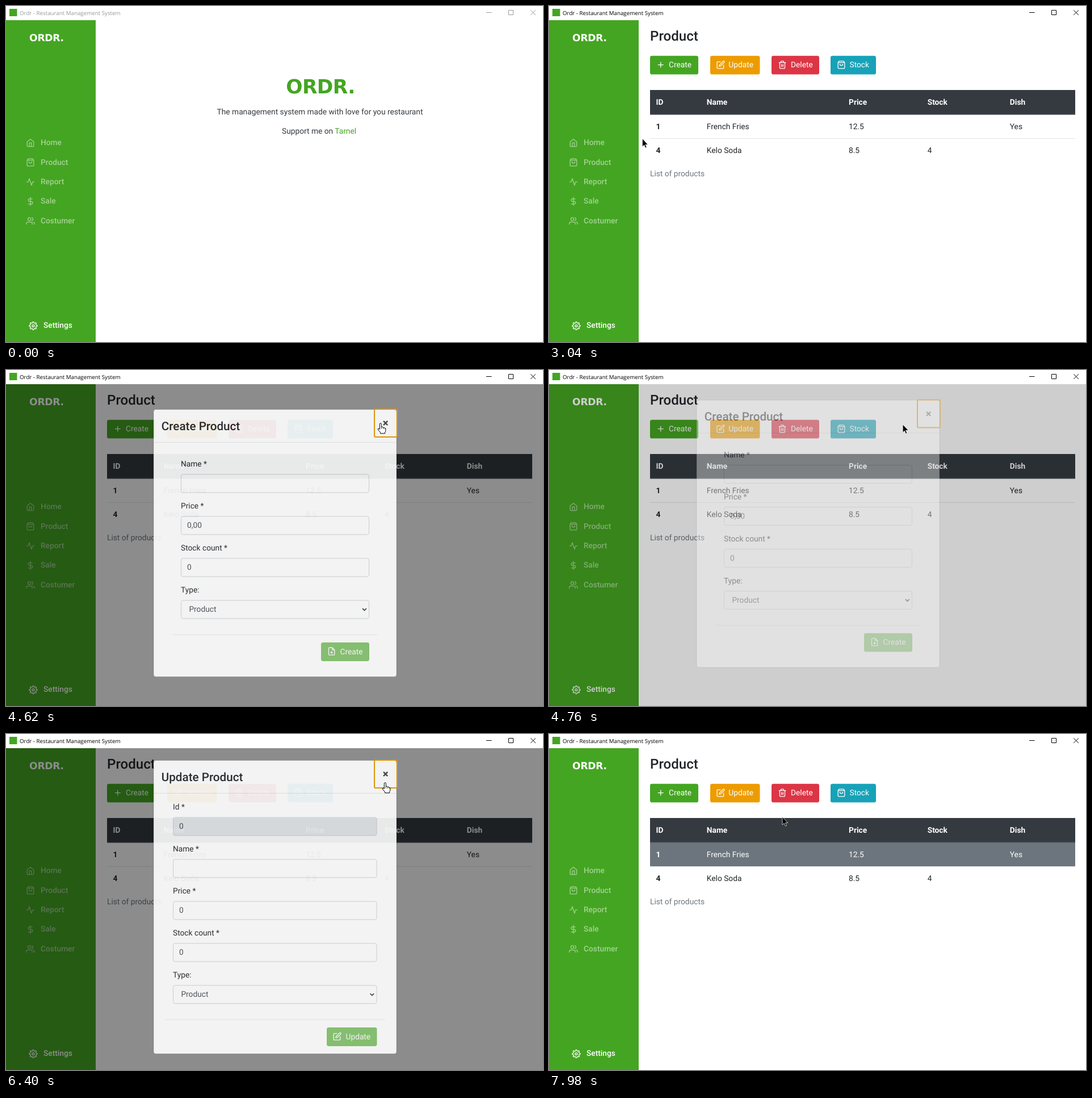
An HTML page that plays this animation: 946 px wide and 592 px high, repeating every 8 s.

```html
<!DOCTYPE html>
<html lang="en">
<head>
<meta charset="utf-8">
<title>Ordr - Restaurant Management System</title>
<style>
  html, body { margin: 0; width: 100%; height: 100%; overflow: hidden; background: #fff; }
  svg { display: block; width: 946px; height: 592px; text-rendering: geometricPrecision; }
  text { font: 13.76px Roboto, sans-serif; fill: #212529; white-space: pre; }
  .icon { fill: none; stroke: #fff; stroke-width: 2; stroke-linecap: round; stroke-linejoin: round; }
  .white { fill: #fff; }
  .soft { fill: #343a40; }
  .muted { fill: #6c757d; }
  .value { fill: #495057; }
  .brand { font-family: 'DejaVu Sans', sans-serif; font-weight: 700; letter-spacing: -.017em; }
  .nav text { fill: #fff; font-weight: 500; }
  .bold { font-weight: 700; }
  .title { font-size: 20.64px; font-weight: 500; }
  .hot rect { fill: #6c757d; }
  .hot text { fill: #fff; }
</style>
</head>
<body>
<svg id="stage" viewBox="0 0 946 592"></svg>
<script>
const GREEN = '#44a522';
const LOOP = 8000;

// Feather-style outlines on a 24 unit grid
const ICONS = {
  home: 'M3 9l9-7 9 7v11a2 2 0 0 1-2 2H5a2 2 0 0 1-2-2zM9 22V12h6v10',
  bag: 'M6 2L3 6v14a2 2 0 0 0 2 2h14a2 2 0 0 0 2-2V6l-3-4zM3 6h18M16 10a4 4 0 0 1-8 0',
  pulse: 'M22 12h-4l-3 9L9 3l-3 9H2',
  dollar: 'M12 1v22M17 5H9.5a3.5 3.5 0 0 0 0 7h5a3.5 3.5 0 0 1 0 7H6',
  users: 'M17 21v-2a4 4 0 0 0-4-4H5a4 4 0 0 0-4 4v2M13 7a4 4 0 1 1-8 0 4 4 0 0 1 8 0zM23 21v-2a4 4 0 0 0-3-3.87M16 3.13a4 4 0 0 1 0 7.75',
  plus: 'M12 5v14M5 12h14',
  edit: 'M11 4H4a2 2 0 0 0-2 2v14a2 2 0 0 0 2 2h14a2 2 0 0 0 2-2v-7M18.5 2.5a2.12 2.12 0 0 1 3 3L12 15l-4 1 1-4z',
  trash: 'M3 6h18M19 6v14a2 2 0 0 1-2 2H7a2 2 0 0 1-2-2V6m3 0V4a2 2 0 0 1 2-2h4a2 2 0 0 1 2 2v2M10 11v6M14 11v6',
  file: 'M14 2H6a2 2 0 0 0-2 2v16a2 2 0 0 0 2 2h12a2 2 0 0 0 2-2V8zM14 2v6h6M12 18v-6M9 15h6',
  gear: gearPath()
};

function gearPath() {
  const pts = [];
  for (let i = 0; i < 96; i++) {
    const a = i / 96 * 2 * Math.PI;
    const r = 9.4 + 1.6 * Math.tanh(2 * Math.cos(8 * a));
    pts.push((12 + r * Math.cos(a)).toFixed(2) + ' ' + (12 + r * Math.sin(a)).toFixed(2));
  }
  return 'M' + pts.join('L') + 'zM15 12a3 3 0 1 1-6 0 3 3 0 0 1 6 0z';
}

const text = (x, y, s, cls = '', extra = '') => `<text x="${x}" y="${y}" class="${cls}" ${extra}>${s}</text>`;
const rect = (x, y, w, h, fill, extra = '') => `<rect x="${x}" y="${y}" width="${w}" height="${h}" fill="${fill}" ${extra}/>`;
const rule = (x1, x2, y, color) => rect(x1, y, x2 - x1, 0.9, color);
const icon = (name, cx, cy, size = 15.5) =>
  `<path class="icon" d="${ICONS[name]}" transform="translate(${cx - size / 2} ${cy - size / 2}) scale(${size / 24})"/>`;

const NAV = [['home', 'Home'], ['bag', 'Product'], ['pulse', 'Report'], ['dollar', 'Sale'], ['users', 'Costumer']];
const navY = i => 240.4 + 34.4 * i;

// x, width, icon, icon centre, label, label x, colour, hover colour
const BUTTONS = [
  [178, 85, 'plus', 196.8, 'Create', 211, GREEN, '#36851b'],
  [284, 87.5, 'edit', 302.5, 'Update', 316.3, '#ed9c00', '#c78300'],
  [392, 84, 'trash', 411, 'Delete', 426, '#dc3545', '#c82333'],
  [496, 80, 'bag', 515, 'Stock', 529.5, '#17a2b8', '#138496']
];
const COLS = [188.5, 277.8, 528, 666.7, 811.8];
const ROWS = [['1', 'French Fries', '12.5', '', 'Yes'], ['4', 'Kelo Soda', '8.5', '4', '']];

function sidebar() {
  return rect(0, 25, 158, 567, GREEN) +
    text(41.1, 62, 'ORDR.', 'brand white', 'style="font-size:17.2px"') +
    NAV.map(([ic, label], i) =>
      `<g class="nav" opacity=".5">${icon(ic, 43, navY(i) + .7)}${text(61, navY(i) + 4.8, label)}</g>`).join('') +
    `<g class="nav">${icon('gear', 48, 563.5)}${text(66, 567, 'Settings')}</g>`;
}

function homePage() {
  return `<g id="home">` +
    text(493.3, 154, 'ORDR.', 'brand', `style="font-size:34.4px;fill:${GREEN}"`) +
    text(553, 191, 'The management system made with love for you restaurant', 'soft', 'text-anchor="middle"') +
    text(486, 225.3, `Support me on <tspan fill="${GREEN}">Tarnel</tspan>`, 'soft') + `</g>`;
}

function productPage() {
  const buttons = BUTTONS.map(([x, w, ic, ix, label, tx, color]) =>
    `<g class="btn">${rect(x, 87.7, w, 32.9, color, 'rx="3.4"')}${icon(ic, ix, 103.6)}${text(tx, 108.4, label, 'white')}</g>`);
  const rows = ROWS.map((cells, r) => {
    const y = 191.4 + 42.1 * r;
    return `<g class="row">${rect(178, y, 749, 42, '#fff')}` +
      cells.map((c, i) => text(COLS[i], y + 25.4, c, i ? '' : 'bold')).join('') + '</g>';
  });
  return `<g id="product">` + text(178, 61, 'Product', '', 'style="font-size:24.08px;font-weight:500"') +
    buttons.join('') + rect(178, 148, 749, 43.4, '#343a40') +
    ['ID', 'Name', 'Price', 'Stock', 'Dish'].map((h, i) => text(COLS[i], 174, h, 'bold white')).join('') +
    rows.join('') + rect(178, 190, 749, 1.6, '#454d55') + rule(178, 927, 233, '#dee2e6') +
    text(178, 300.3, 'List of products', 'muted') + `</g>`;
}

// Fields are [label, value, kind]; y values are relative to the dialog's top edge
function dialog(d) {
  const fields = d.fields.map(([label, value, kind], i) => {
    const y = d.first + 74 * i, isSelect = kind === 'select';
    return text(d.x, y - 13.4, label) +
      rect(d.x + .5, y + .5, d.w - 1, 32, kind === 'locked' ? '#e9ecef' : '#fff', 'rx="3.4" stroke="#ced4da"') +
      text(d.x + (isSelect ? 14.4 : 11), y + 20.9, value, 'value') +
      (isSelect ? `<path d="M${d.x + d.w - 12} ${y + 14.8}l3.4 3.4 3.4-3.4" fill="none" stroke="#343a40" stroke-width="1.7"/>` : '');
  }).join('');
  const hr = d.first + 74 * (d.fields.length - 1) + 60.3;
  const right = d.x + d.w;
  return `<g class="dialog" display="none">` +
    rect(260, .5, 428, d.h - 1, '#fff', 'rx="4" stroke="#000" stroke-opacity=".2"') +
    text(273.8, 36.6, d.title, 'title') + rule(260.5, 687.5, 58, '#dee2e6') +
    `<path class="x" d="M665 21l7.2 7.2M672.2 21l-7.2 7.2" stroke="#000" stroke-width="2.4"/>` +
    rect(649, 0, 40, 49, 'none', 'class="ring" rx="2" stroke="#e59700" stroke-width="2"') +
    fields + rule(d.x - 14, right + 14, hr, '#e5e5e5') +
    `<g opacity=".65">${rect(right - d.bw, hr + 14.3, d.bw, 32.9, GREEN, 'rx="3.4"')}` +
    icon(d.icon, right - d.bw + 18.6, hr + 30) + text(right - d.bw + 33.5, hr + 35, d.action, 'white') + `</g></g>`;
}

const DIALOGS = [
  { title: 'Create Product', x: 308, w: 332, first: 114.5, h: 472, top: 72.5, icon: 'file', action: 'Create', bw: 85,
    fields: [['Name *', ''], ['Price *', '0,00'], ['Stock count *', '0'], ['Type:', 'Product', 'select']],
    open: 3624, press: 4530, close: 4599 },
  { title: 'Update Product', x: 294, w: 359.5, first: 100.5, h: 518, top: 49.5, icon: 'edit', action: 'Update', bw: 88.5,
    fields: [['Id *', '0', 'locked'], ['Name *', ''], ['Price *', '0'], ['Stock count *', '0'], ['Type:', 'Product', 'select']],
    open: 5326, press: 6315, close: 6384 }
];

function titleBar() {
  return rect(0, 0, 946, 25, '#fff') + rect(6, 5, 13.5, 13, GREEN) +
    `<g id="bar">` + text(24, 15.6, 'Ordr - Restaurant Management System', '', `style="font:9.75px 'Open Sans',sans-serif;fill:currentColor"`) +
    `<path d="M846 11.5h9.5M885.5 7.5h8v8h-8zM924.3 7.3l8.6 8.6M932.9 7.3l-8.6 8.6" fill="none" stroke="currentColor"/></g>`;
}

const cursors =
  `<g id="cursor"><path id="arrow" d="M0 0V14.2L3.2 11.2 5.4 16.2 7.6 15.2 5.4 10.4H9.8Z" fill="#000" stroke="#fff" stroke-width=".7"/>` +
  `<g id="hand" stroke="#000"><path d="M-1.7 10.5V1.2a1.5 1.5 0 0 1 3 0V6.2q3 .1 3.2 1 2.6 .1 2.8 1 1.5.2 1.5 1.6v2.8q0 2-1.2 3.2v2h-8v-1.6L-4.6 11q-.8-1.6.6-1.9 1-.1 2.3 1.4z" fill="#fff"/>` +
  `<path d="M1.3 6.2v3.6M4.5 7.2v2.8M7.3 8.2v2" fill="none" stroke-width=".8"/></g></g>`;

const stage = document.getElementById('stage');
stage.innerHTML = rect(0, 0, 946, 592, '#fff') + sidebar() + homePage() + productPage() +
  rect(0, 25, 946, 567, '#000', 'id="shade" opacity="0"') + DIALOGS.map(dialog).join('') + titleBar() + cursors;

const $ = id => document.getElementById(id);
const all = sel => [...stage.querySelectorAll(sel)];
const navEls = all('.nav').slice(0, NAV.length), btnEls = all('.btn'), rowEls = all('.row'), dialogEls = all('.dialog');
const show = (el, on) => el.setAttribute('display', on ? 'inline' : 'none');

// Bursts of motion: start, end, number of steps
const BURSTS = [
  [220, 680, 7], [850, 1240, 6], [1410, 1480, 2], [1800, 1880, 2], [2030, 2430, 6], [2750, 3520, 11],
  [3600, 4370, 11], [4460, 5230, 11], [5300, 6090, 11], [6320, 7030, 10], [7350, 7980, 9]
];
// Pointer path: time, x, y
const PATH = [
  [220, 684, 432], [680, 112, 143], [775, 112, 143], [1160, 98, 262], [1240, 98, 265], [1340, 98, 265],
  [1480, 95, 241], [1950, 95, 241], [2110, 100, 268], [2190, 101, 275], [2680, 101, 275], [3140, 198, 212],
  [3500, 251, 119.3], [3680, 251, 119.3], [4370, 665, 99], [4400, 665, 99], [4530, 660, 94], [4616, 660, 94],
  [5215, 366, 109.5], [5385, 366, 109.5], [6090, 670, 92], [6250, 670, 92], [6320, 668, 86], [6405, 668, 86],
  [6950, 444, 112], [7270, 444, 112], [7820, 428, 204], [7905, 423, 195], [7980, 411, 146]
];
const LAG = 77;

function stepped(t) {
  const burst = BURSTS.filter(b => b[0] <= t).pop();
  if (!burst) return 0;
  const [a, b, n] = burst, d = (b - a) / (n - 1);
  return a + d * Math.min(n - 1, Math.floor((t - a) / d + 1e-6));
}

function pointer(t) {
  const i = PATH.findIndex(p => p[0] > t);
  if (i === 0) return PATH[0].slice(1);
  if (i < 0) return PATH[PATH.length - 1].slice(1);
  const [t0, x0, y0] = PATH[i - 1], [t1, x1, y1] = PATH[i];
  const k = (t - t0) / (t1 - t0);
  return [x0 + (x1 - x0) * k, y0 + (y1 - y0) * k];
}

const clamp = v => Math.max(0, Math.min(1, v));
const easeOut = p => 1 - Math.pow(1 - clamp(p), 1.7);
const within = (v, a, b) => v >= a && v < b;

function draw(time) {
  const t = stepped(time);
  const [x, y] = pointer(t), [hx, hy] = pointer(t - LAG);
  const onProduct = t >= 2349;
  let shade = 0, blocked = false, overClose = false;

  DIALOGS.forEach((d, i) => {
    const closing = t >= d.close, since = t - (closing ? d.close : d.open);
    const fade = clamp(since / 150), slide = easeOut(since / 300);
    const alpha = closing ? 1 - fade : fade;
    const lift = 43 * (closing ? slide : 1 - slide);
    const el = dialogEls[i];
    show(el, alpha > 0);
    el.setAttribute('opacity', alpha);
    el.setAttribute('transform', `translate(0 ${d.top - lift})`);
    show(el.querySelector('.ring'), t >= d.press);
    const solid = alpha > .5;
    const over = solid && within(hx, 649, 689) && within(hy, d.top, d.top + 50);
    el.querySelector('.x').setAttribute('opacity', over ? .75 : .5);
    shade = Math.max(shade, alpha / 2);
    blocked = blocked || solid;
    overClose = overClose || over;
  });
  $('shade').setAttribute('opacity', shade);

  let overNav = false;
  navEls.forEach((el, i) => {
    const hot = !blocked && t > 0 && within(hx, 36, 122) && Math.abs(hy - navY(i)) < 12;
    el.setAttribute('opacity', hot ? .85 : .5);
    overNav = overNav || hot;
  });
  btnEls.forEach((el, i) => {
    const [bx, w, , , , , color, hover] = BUTTONS[i];
    const hot = !blocked && within(hx, bx, bx + w) && within(hy, 88, 121);
    el.firstChild.setAttribute('fill', hot ? hover : color);
  });
  rowEls.forEach((el, i) => {
    const hot = !blocked && within(hx, 178, 927) && within(hy, 191.5 + 42 * i, 233.5 + 42 * i);
    el.classList.toggle('hot', hot);
  });

  show($('home'), !onProduct);
  show($('product'), onProduct);
  $('bar').style.color = t >= 1800 ? '#000' : '#999';

  const hand = overNav || overClose;
  show($('cursor'), t > 0);
  show($('arrow'), !hand);
  show($('hand'), hand);
  $('cursor').setAttribute('transform', `translate(${x} ${y})`);
}

const start = performance.now();
function tick() {
  draw((performance.now() - start) % LOOP);
  requestAnimationFrame(tick);
}
tick();
</script>
</body>
</html>
```
